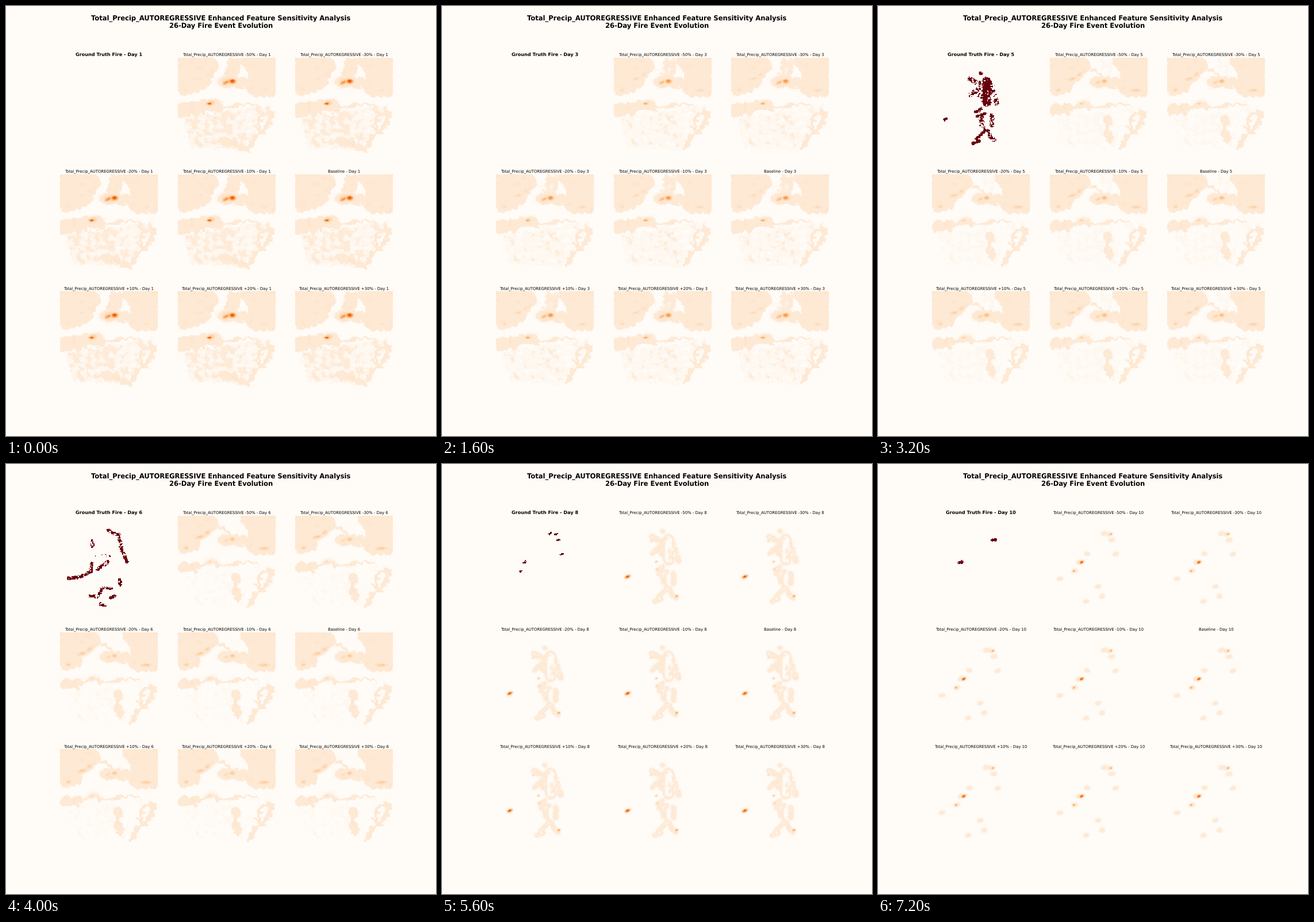
These frames come from a looping animation (748 by 748 pixels, 8000 ms). A matplotlib script:

```python
import numpy as np
import matplotlib.pyplot as plt
from matplotlib.animation import FuncAnimation
from matplotlib.colors import ListedColormap
from matplotlib.path import Path

plt.rcParams["text.hinting"] = "none"
plt.rcParams["font.family"] = "DejaVu Sans"

N = 128          # grid cells per map side
SPAN = 170       # map units per side
DAYS = 10
PAPER, PINK_PAPER = "#fffbf6", "#fff9f5"
PT = 17 / 18     # type scale
FEATURE = "Total_Precip_AUTOREGRESSIVE"
CHANGES = ["-50%", "-30%", "-20%", "-10%", None, "+10%", "+20%", "+30%"]

axis = (np.arange(N) + 0.5) * SPAN / N
X, Y = np.meshgrid(axis, axis)


def blur(a, passes):
    for _ in range(passes):
        p = np.pad(a, 1, mode="edge")
        a = (p[:-2, 1:-1] + p[2:, 1:-1] + p[1:-1, :-2] + p[1:-1, 2:]
             + 2 * p[1:-1, 1:-1]) / 6
    return a


def noise(seed, passes):
    a = blur(np.random.default_rng(seed).normal(size=(N, N)), passes)
    return (a - a.mean()) / a.std()


WHITE = np.clip(noise(1, 0), -2, 2)
CLUMP = noise(2, 1)
PATCH = noise(3, 12)
WX, WY = X + 1.8 * noise(4, 6), Y + 1.8 * noise(5, 6)
even = np.arange(N) % 2 == 0
LATTICE = np.where(np.outer(even, even), 1.0, -0.5)


def path_dist(points, x=X, y=Y):
    best = np.full((N, N), np.inf)
    for (x0, y0), (x1, y1) in zip(points, points[1:]):
        dx, dy = x1 - x0, y1 - y0
        t = np.clip(((x - x0) * dx + (y - y0) * dy) / (dx**2 + dy**2), 0, 1)
        best = np.minimum(best, np.hypot(x - x0 - t * dx, y - y0 - t * dy))
    return best


class Field:
    """Predicted risk: broad pale cover plus local heat."""

    def __init__(self):
        self.cover = np.zeros((N, N))
        self.heat = np.zeros((N, N))

    def land(self, *pts, w=1.0):
        cells = np.column_stack([WX.ravel(), WY.ravel()])
        inside = Path(pts).contains_points(cells).reshape(N, N)
        self.cover = np.maximum(self.cover, w * blur(inside.astype(float), 2))

    def band(self, *pts, r=3, w=1.0):
        near = np.clip(0.5 + (r - path_dist(pts, WX, WY)) / 3, 0, 1)
        self.cover = np.maximum(self.cover, w * near)

    def hot(self, x, y, rx, ry, level, deg=-15):
        c, s = np.cos(np.radians(deg)), np.sin(np.radians(deg))
        u, v = (X - x) * c + (Y - y) * s, (Y - y) * c - (X - x) * s
        spot = level * np.exp(-((u / rx) ** 2 + (v / ry) ** 2))
        self.heat = np.maximum(self.heat, spot)

    def values(self):
        edge = 0.5 + 0.09 * PATCH + 0.04 * WHITE - 0.14 * LATTICE
        solid = np.clip((self.cover - edge) * 5, 0, 1)
        pale = np.where(self.cover > edge, 0.065 + 0.035 * solid, 0)
        pale += 0.03 * solid * np.clip(PATCH - 1.1, 0, 1) * (1 + LATTICE)
        glow = self.heat * (1 + 0.16 * LATTICE + 0.1 * CLUMP)
        return np.maximum(pale, glow)


def dry_spell(day):
    """Cover thins out and old heat cools while the west warms up."""
    f = Field()
    t = (day - 1) / 5
    early = 1 - t
    # northern land
    f.land((-4, -4), (68, -4), (69, 22), (42 + 16 * early, 46), (36, 63),
           (4, 66), (-3, 50))
    f.land((106, -4), (174, -4), (174, 68), (132, 70), (118, 55), (116, 36),
           (126, 28), (108, 14))
    f.band((78, 43), (90, 43), (122, 45), r=9)
    f.band((97, 10), (92, 34), r=11, w=1 - 0.75 * t)
    f.band((76, 20), (92, 32), r=3, w=t)
    # middle belt
    f.band((-4, 92), (14, 92), (32, 90), r=8 + 5 * early)
    f.band((32, 90), (58, 82), (70, 86), r=3 + 7 * early)
    f.band((70, 87), (90, 87), (112, 81), (134, 83), r=2.5)
    # southern valley, ring and tail
    f.land((8, 108), (60, 96), (166, 80), (150, 112), (112, 162), (60, 158),
           (20, 160), w=0.56 - 0.26 * t)
    f.band((99, 108), (103, 142), r=7, w=0.35 + 0.6 * t)
    f.band((76, 146), (98, 149), (120, 161), r=7, w=max(0, 1 - 1.4 * t))
    f.band((139, 122), (142, 104), (154, 95), (163, 100), (156, 119),
           (145, 130), (139, 122), r=4)
    f.band((144, 129), (132, 144), (122, 158), r=4)
    # cooling fires
    north, south = 0.7 * 0.83**(day - 1), 0.75 * 0.78**(day - 1)
    f.hot(89, 42, 15, 7, 0.4 * north, 0)
    f.hot(84, 44, 7, 3.5, 0.8 * north, -25)
    f.hot(95, 42, 6, 4.5, north, 0)
    f.hot(57, 80, 9, 5, 0.45 * south)
    f.hot(55, 81, 5, 2.2, south, 0)
    # warming ground
    rise = 0.12 + 0.022 * day
    f.hot(38, 38, 11, 4, rise)
    f.hot(51, 30, 9, 5, 0.85 * rise, -35)
    f.hot(15, 57, 6, 4, rise)
    f.hot(150, 58, 13, 4, rise, 0)
    return f.values()


def first_fire():
    f = Field()
    f.band((24, 14), (44, 20), (56, 12), r=13, w=0.9)
    f.band((12, 34), (30, 42), (56, 22), r=6, w=0.8)
    f.band((148, 14), (146, 48), r=13, w=0.52)
    f.band((134, 65), (164, 65), r=1, w=0.55)
    f.band((62, 60), (60, 82), (74, 88), (92, 83), r=4, w=0.9)
    f.band((6, 95), (20, 92), r=3, w=0.8)
    f.band((154, 110), (161, 105), r=3, w=0.55)
    f.hot(58, 16, 7, 5, 0.16, 30)
    f.hot(75, 48, 11, 15, 0.14)
    f.hot(99, 45, 11, 7, 0.17)
    f.hot(99, 45, 5, 2.6, 0.5, 15)
    for i in range(5):
        for j in range(6):
            f.hot(67 + 4 * i, 40 + 4 * j, 1.3, 1.3, 0.3 + 0.07 * ((i + 2 * j) % 4))
    f.hot(72, 54, 1.5, 1.5, 0.8)
    return f.values()


def burn(paths, r, share=1.0):
    near = path_dist(paths[0])
    for path in paths[1:]:
        near = np.minimum(near, path_dist(path))
    return (near + 0.5 * WHITE < r) & (CLUMP <= np.quantile(CLUMP, share))


# Places that keep smouldering, longest lived first
EMBERS = [(50, 82), (108, 43), (104, 33), (114, 68), (43, 97), (94, 32),
          (17, 111), (84, 124), (63, 150), (91, 141), (65, 67)]
FRONT = [[(84, 26), (93, 32), (104, 34)], [(103, 40), (108, 62), (116, 81)],
         [(15, 110), (36, 107), (54, 98), (55, 84)], [(66, 94), (84, 81)],
         [(52, 141), (66, 141), (74, 126), (88, 127)], [(88, 144), (95, 141)],
         [(70, 155), (78, 157)], [(104, 112), (105, 121)], [(56, 46), (56, 54)]]
STREAKS = [[(76, 95), (85, 90)], [(78, 103), (92, 98)], [(77, 142), (91, 129)],
           [(71, 150), (82, 146)], [(22, 108), (25, 107)], [(84, 28), (86, 28)]]
FLANKS = [[(66, 38), (82, 46)], [(68, 66), (82, 54)], [(76, 62), (86, 68)],
          [(104, 50), (112, 80)], [(86, 104), (87, 118)], [(104, 102), (104, 118)],
          [(93, 125), (107, 144)]]


def burnt(day):
    if day < 4:
        return np.zeros((N, N))
    if day == 4:
        mask = burn([[(70, 42), (80, 58)], [(97, 44), (102, 46)]], 3, 0.7)
    elif day == 5:
        mask = (burn([[(95, 42), (95, 78)]], 8, 0.94) | burn(STREAKS, 2.4)
                | burn(FLANKS, 4, 0.55))
    elif day == 6:
        mask = (burn(FRONT, 2.8, 0.8)
                | burn([[(64, 70), (90, 72)]], 2.5, 0.25))
    else:
        alive = round(len(EMBERS) * 0.55**(day - 7))
        r = 1.6 + 0.5 * abs(day - 8)
        mask = burn([[(x - r, y + 0.5), (x + r, y - 0.5)]
                     for x, y in EMBERS[:alive]], r)
    return mask.astype(float)


FLARES = {8: [(24, 107, 0.9), (109, 141, 0.5), (65, 45, 0.27), (74, 81, 0.3),
              (76, 94, 0.3)],
          9: [(116, 79, 0.35), (20, 109, 0.35)],
          10: [(55, 82, 0.8), (42, 97, 0.48), (106, 33, 0.42)]}


def afterglow(day):
    """Faint halo of the burn three days back, with a few flares."""
    f = Field()
    for x, y, level in FLARES[day]:
        f.hot(x, y, 1.5 + 3 * level, 1.5 + level, level, -25)
    soft = blur(burnt(day - 3), 5)
    halo = 0.42 * soft * (1 - soft) * (1 + 0.2 * LATTICE)
    return np.maximum(halo, f.values())


def risk(day):
    if day < 7:
        return dry_spell(day)
    return first_fire() if day == 7 else afterglow(day)


RISK = [risk(d + 1) for d in range(DAYS)]
BURNT = [burnt(d + 1) for d in range(DAYS)]

# the lowest risk fades into the paper
shades = plt.get_cmap("Oranges")(np.linspace(0, 1, 256))
shades[:20, 3] = np.linspace(0, 1, 20)
heat_map = ListedColormap(shades)
burn_map = ListedColormap([(1, 1, 1, 0), "#67000d"])

fig, axes = plt.subplots(3, 3, figsize=(17, 17), dpi=44, facecolor=PAPER)
fig.suptitle(f"{FEATURE} Enhanced Feature Sensitivity Analysis\n"
             "26-Day Fire Event Evolution", fontsize=20 * PT, fontweight="bold")
panels = axes.ravel()
for ax in panels:
    ax.axis("off")

truth = panels[0].imshow(BURNT[0], cmap=burn_map, vmin=0, vmax=1,
                         interpolation="nearest")
risks = [ax.imshow(RISK[0], cmap=heat_map, vmin=0, vmax=1,
                   interpolation="bilinear") for ax in panels[1:]]
names = ["Ground Truth Fire"]
names += [f"{FEATURE} {c}" if c else "Baseline" for c in CHANGES]
titles = [ax.set_title("", fontsize=12 * PT, pad=6 * PT) for ax in panels]
titles[0].set(fontsize=14 * PT, fontweight="bold")


def update(i):
    day = i + 1
    fig.set_facecolor(PINK_PAPER if day == 7 else PAPER)
    truth.set_data(BURNT[i])
    for im in risks:
        im.set_data(RISK[i])
    for title, name in zip(titles, names):
        title.set_text(f"{name} - Day {day}")
    return [truth, *risks, *titles]


anim = FuncAnimation(fig, update, frames=DAYS, interval=800, repeat=True,
                     repeat_delay=0, blit=False)
plt.show()
```
